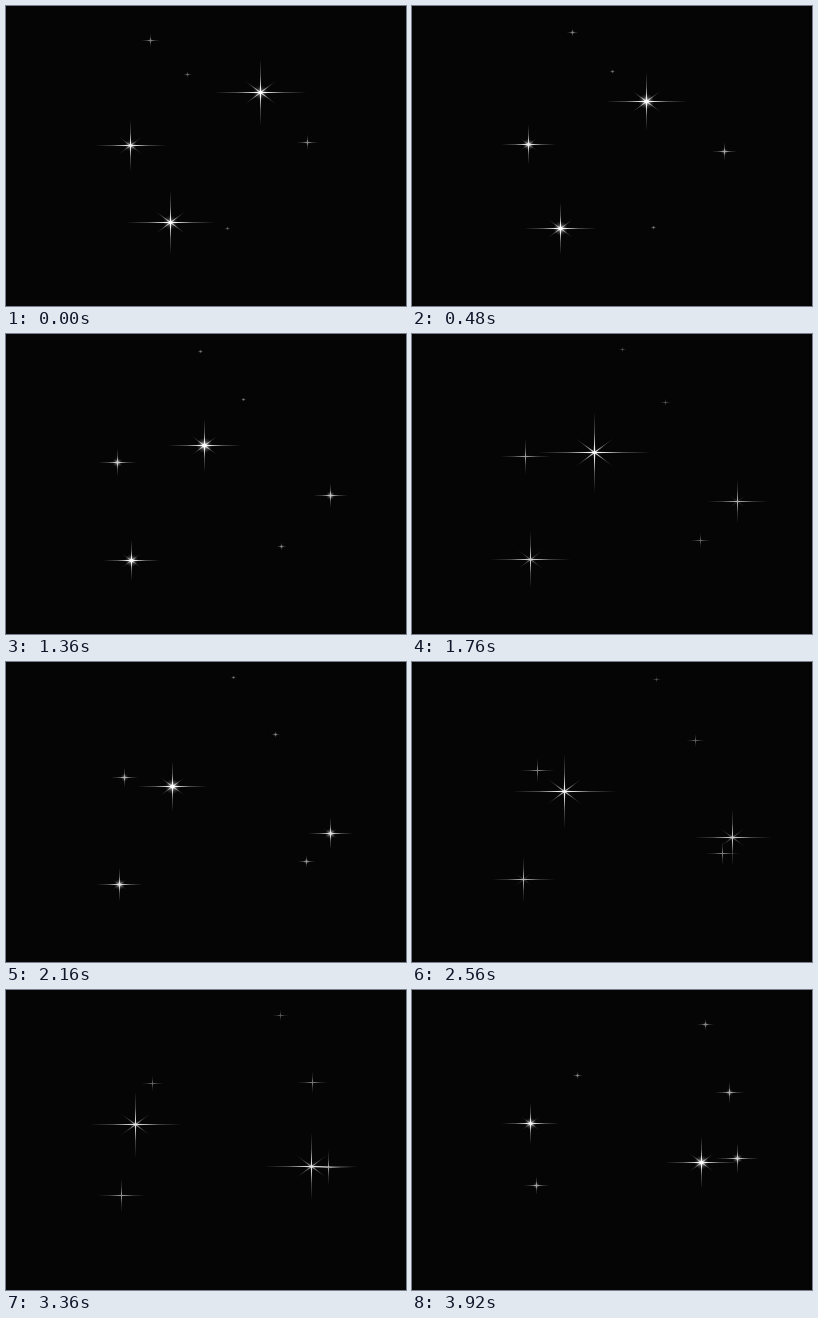
Recreate the animation shown at these times as an HTML page. Size 400 px wide and 300 px high, loop 4000 ms.

```html
<!DOCTYPE html>
<html lang="en">
<head>
<meta charset="utf-8">
<title>Turning stars</title>
<style>
  html, body { margin: 0; width: 100%; height: 100%; overflow: hidden; background: #050505; }
  svg { display: block; width: 100vw; height: 100vh; }
</style>
</head>
<body>
<svg id="sky" viewBox="0 0 400 300">
  <defs>
    <linearGradient id="across">
      <stop offset="0" stop-color="#fff" stop-opacity="0"/>
      <stop offset=".25" stop-color="#fff" stop-opacity=".3"/>
      <stop offset=".5" stop-color="#fff"/>
      <stop offset=".75" stop-color="#fff" stop-opacity=".3"/>
      <stop offset="1" stop-color="#fff" stop-opacity="0"/>
    </linearGradient>
    <linearGradient id="down" href="#across" x2="0" y2="1"/>
    <radialGradient id="halo">
      <stop offset="0" stop-color="#fff"/>
      <stop offset=".3" stop-color="#fff" stop-opacity=".65"/>
      <stop offset=".65" stop-color="#fff" stop-opacity=".2"/>
      <stop offset="1" stop-color="#fff" stop-opacity="0"/>
    </radialGradient>
  </defs>
</svg>
<script>
const NS = 'http://www.w3.org/2000/svg';
const LOOP = 4000, STEP = 80;
const TURN = Math.PI / 2 / LOOP; // radians per ms
const PULSE = 800;
const RING = { x: 218.1, rx: 107, bob: 32 };

// Starting angle on the ring in degrees, and mean height
const stars = [
  { angle: 316.2, level: 46.9 },
  { angle: 339.6, level: 96 },
  { angle: 1.3, level: 190.4 },
  { angle: 242.1, level: 107.4 },
  { angle: 410.5, level: 144.1 },
  { angle: 210.3, level: 193.6 },
  { angle: 160.4, level: 102 }
];

function add(parent, tag, attrs = {}) {
  const el = document.createElementNS(NS, tag);
  parent.append(el);
  set(el, attrs);
  return el;
}

function set(el, attrs) {
  for (const key in attrs) el.setAttribute(key, attrs[key]);
}

const clamp = v => Math.max(0, Math.min(1, v));
const diamond = (a, b) => `${-a},0 0,${-b} ${a},0 0,${b}`;

const sky = document.getElementById('sky');
add(sky, 'rect', { width: 400, height: 300, fill: '#050505' });

for (const s of stars) {
  s.g = add(sky, 'g');
  s.halo = add(s.g, 'circle', { fill: 'url(#halo)' });
  s.row = add(s.g, 'rect', { y: -.5, height: 1, fill: 'url(#across)' });
  s.col = add(s.g, 'rect', { x: -.5, width: 1, fill: 'url(#down)' });
  s.wide = add(s.g, 'polygon', { fill: 'url(#across)' });
  s.tall = add(s.g, 'polygon', { fill: 'url(#down)' });
  s.diags = [1, -1].map(side => ({ side, el: add(s.g, 'polygon', { fill: 'url(#across)' }) }));
  s.core = add(s.g, 'circle', { fill: '#fff' });
}

function drawStar(s, t) {
  const a = s.angle * Math.PI / 180 + TURN * t;
  const x = Math.round(RING.x + RING.rx * Math.sin(a));
  const y = Math.round(s.level + RING.bob * Math.cos(1.5 * a));
  const near = (1 - Math.cos(a)) / 2;

  // Rays shrink while the centre glows, then stretch again
  const beat = Math.cos(2 * Math.PI * (t / PULSE - .25));
  const glow = clamp(.6 - .65 * beat);
  const h = (4 + 54 * near) * (.82 + .19 * beat);
  const v = h * .72;
  const thick = .25 + near * .6;

  set(s.g, { transform: `translate(${x + .5} ${y + .5})`, opacity: clamp(.3 + .75 * near + .15 * glow) });
  set(s.row, { x: -h, width: 2 * h });
  set(s.col, { y: -v, height: 2 * v });
  set(s.wide, { points: diamond(h * .5, thick) });
  set(s.tall, { points: diamond(thick, v * .5) });
  set(s.halo, { r: 2 + near * 6, opacity: .08 + glow * .65 });
  set(s.core, { r: .3 + near * (.9 + glow * .9) });

  const dx = h * .37, dy = v * .38;
  const tilt = Math.atan2(dy, dx) * 180 / Math.PI;
  for (const { side, el } of s.diags) set(el, {
    points: diamond(Math.hypot(dx, dy), .65),
    transform: `rotate(${side * tilt})`,
    opacity: clamp((near - .35) * 1.6)
  });
}

function draw(ms) {
  const t = Math.floor((ms % LOOP) / STEP) * STEP;
  for (const s of stars) drawStar(s, t);
}

const start = performance.now();
function tick() {
  draw(performance.now() - start);
  requestAnimationFrame(tick);
}
draw(0);
requestAnimationFrame(tick);
</script>
</body>
</html>
```
